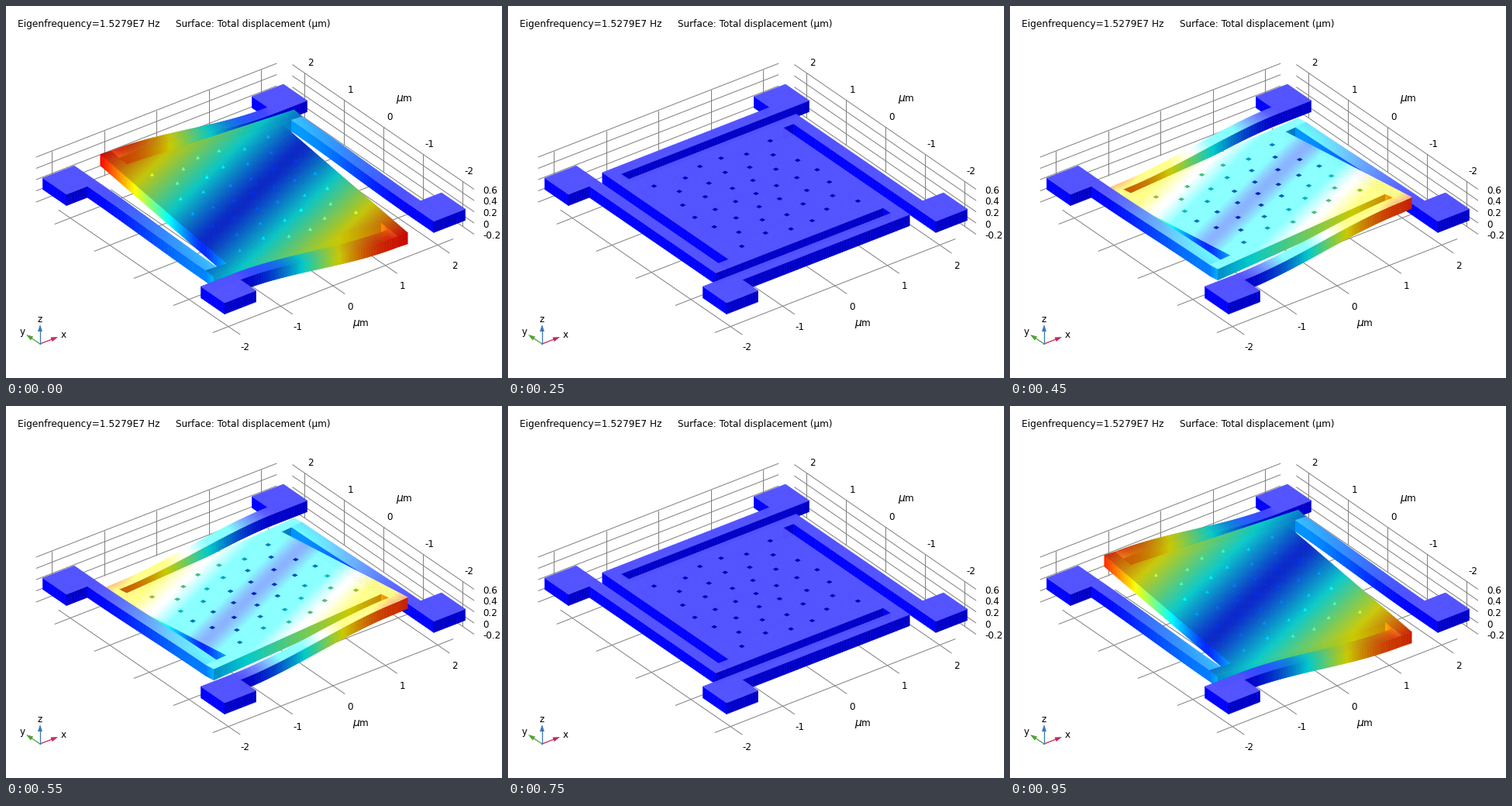
Animation of 640x480 px, one loop 1000 ms. Source, as a matplotlib script:

```python
import numpy as np
import matplotlib.pyplot as plt
from matplotlib.animation import FuncAnimation
from matplotlib.collections import LineCollection, PolyCollection

W, H, DPI = 640, 480, 100
FRAMES, INTERVAL = 20, 50
PX = 72 / DPI                      # one pixel in points
CELL, THICK = 0.05, 14.5           # mesh step in um, slab height in pixels
LIFT, SWAY = 23.5, 0.055           # corner travel in pixels, in-plane share
BOX, WALL, FLOOR = 2.3, 2.47, 49

plt.rcParams["font.family"] = "DejaVu Sans"


def project(x, y, drop=0.0):
    """Orthographic view; drop is pixels below the undeformed top face."""
    return np.stack([320 + 67.5 * x - 51 * y,
                     242 - 26.3 * x - 35 * y + drop], axis=-1)


# Tilting mode, scaled so that the outermost plate corner moves by 1
ANGLE = np.radians(25)
SLOPE = np.array([-np.sin(ANGLE), np.cos(ANGLE)])
SLOPE /= SLOPE @ [-1.5, 1.9]


def deflection(x, y):
    """Vertical motion and how far each point takes part in it (0 at pads)."""
    u, v = SLOPE
    w = u * x + v * y
    share = np.ones_like(w)
    p, q = x, y
    for _ in range(4):             # same clamped beam on each side
        t = np.clip((1.7 - q) / 3, 0, 1)
        ease = 3 * t**2 - 2 * t**3
        on_beam = (p < -1.6) & (q > -1.3)
        w = np.where(on_beam, (u * p - 1.3 * v) * ease, w)
        share = np.where(on_beam, ease, share)
        p, q, u, v = -q, p, -v, u
    return w, share


def is_solid(x, y):
    solid = (abs(x) < 1.5) & (abs(y) < 1.5)
    p, q = x, y
    for _ in range(4):
        pad = (p > -2.3) & (p < -1.7) & (q > 1.7) & (q < 2.3)
        beam = (p > -1.9) & (p < -1.7) & (q > -1.5) & (q < 1.75)
        arm = (p > -1.9) & (p < -1.4) & (q > -1.5) & (q < -1.3)
        solid = solid | pad | beam | arm
        p, q = -q, p
    return solid


def rainbow(f):
    third = [1 / 3, 2 / 3]
    return np.stack([np.interp(f, third, [0, 1]),
                     np.interp(f, [0, *third, 1], [0, 1, 1, 0]),
                     np.interp(f, third, [1, 0])], axis=-1)


# Mesh: visible top, left (-x) and front (-y) faces
n = round(2 * BOX / CELL)
centre = -BOX + CELL * (np.arange(n) + 0.5)
cx, cy = np.meshgrid(centre, centre, indexing="ij")
solid = is_solid(cx, cy)
padded = np.pad(solid, 1)
open_left = solid & ~padded[:-2, 1:-1]
open_front = solid & ~padded[1:-1, :-2]


def faces(mask, ox, oy, drops):
    x = cx[mask][:, None] + np.array(ox) * CELL / 2
    y = cy[mask][:, None] + np.array(oy) * CELL / 2
    return x, y, np.broadcast_to(np.array(drops) * THICK, x.shape)


parts = [faces(solid, [-1, 1, 1, -1], [-1, -1, 1, 1], [0, 0, 0, 0]),
         faces(open_left, [-1, -1, -1, -1], [-1, 1, 1, -1], [0, 0, 1, 1]),
         faces(open_front, [-1, 1, 1, -1], [-1, -1, -1, -1], [0, 0, 1, 1])]
kind = np.repeat([0, 1, 2], [len(p[0]) for p in parts])
fx, fy, fdrop = (np.concatenate(c) for c in zip(*parts))
fw, fshare = deflection(fx, fy)
mean_w = fw.mean(axis=1)
total = np.hypot(mean_w, SWAY * fshare.mean(axis=1))
flat = project(fx, fy, fdrop)
depth = (-0.517 * fx - 0.684 * fy - 0.518 * fdrop / 72.5).mean(axis=1)
slope_x = (fw[:, 1] - fw[:, 0]) / CELL
slope_y = (fw[:, 3] - fw[:, 0]) / CELL
facing = (slope_y - slope_x) / (SLOPE @ [-1, 1])

# Etch holes: centre, three rings and the corners
rings = [(0.39 * k * np.cos(a), 0.39 * k * np.sin(a))
         for k in (1, 2, 3) for a in np.arange(6 * k) * np.pi / (3 * k)]
corners = [(sx * 1.11, sy * 1.11) for sx in (-1, 1) for sy in (-1, 1)]
hx, hy = np.array([(0, 0)] + rings + corners).T
hw, _ = deflection(hx, hy)


def mesh_state(s):
    verts = flat.copy()
    verts[..., 1] -= LIFT * s * fw
    tilt = s * facing
    gain = np.interp(tilt, [-1, 0, 0.8, 1], [1, 1, 0.8, 0.74])
    glow = np.interp(tilt, [-1, -0.6, 0, 0.8, 1], [140, 126, 82, 14, 8]) / 255
    gain = np.choose(kind, [gain, 1.0, 0.79])
    glow = np.where(kind == 0, glow, 0)
    rgb = rainbow(abs(s) * total) * gain[:, None] + glow[:, None]
    order = np.argsort(depth + 0.518 * LIFT / 72.5 * s * mean_w)
    return verts[order], np.clip(rgb, 0, 1)[order]


def hole_state(s):
    up = max(s, 0)
    half = 4 - 1.5 * up
    shape = np.array([[-half, 1.5 * up], [0, -2.2 - 0.4 * up],
                      [half, 1.5 * up], [0, 2.2]])
    pos = project(hx, hy, -LIFT * s * hw)
    rgb = rainbow(abs(s) * np.hypot(hw, SWAY)) * (0.75 + 0.25 * up)
    return pos[:, None] + shape, rgb


fig = plt.figure(figsize=(W / DPI, H / DPI), dpi=DPI, facecolor="white")
ax = fig.add_axes([0, 0, 1, 1])
ax.set(xlim=(0, W), ylim=(H, 0))
ax.axis("off")


def label(x, y, text, size=12, ha="center", **style):
    ax.text(x, y, text, fontsize=size * PX, ha=ha, va="center_baseline",
            color="black", **style)


# Grid on the two back walls and the floor
grid = []


def grid_line(a, b):
    grid.append([project(*a), project(*b)])


Z_DROPS = [-21 + 14.5 * i for i in range(5)]
for d in Z_DROPS:
    grid_line((-BOX, WALL, d), (BOX, WALL, d))
    grid_line((WALL, BOX, d), (WALL, -BOX, d))
for t in range(-2, 3):
    grid_line((t, WALL, Z_DROPS[0]), (t, WALL, Z_DROPS[-1]))
    grid_line((WALL, t, Z_DROPS[0]), (WALL, t, Z_DROPS[-1]))
    grid_line((t, -BOX, FLOOR), (t, BOX, FLOOR))
    grid_line((-BOX, t, FLOOR), (BOX, t, FLOOR))
    x, y = project(t, -BOX, FLOOR)
    label(x + 6.5, y + 15, str(t))
    x, y = project(WALL, t, Z_DROPS[0])
    label(x + 8.5, y - 14, str(t))
for d, text in zip(Z_DROPS, ["0.6", "0.4", "0.2", "0", "-0.2"]):
    label(615.5, 258 + d, text, ha="left")
ax.add_collection(LineCollection(grid, colors="#808080", linewidths=PX,
                                 zorder=1))

for x, y in [(513, 118), (457, 408)]:
    label(x - 5, y, "μ", 14, style="italic")
    label(x + 5, y, "m")
label(15, 22, "Eigenfrequency=1.5279E7 Hz", 12.2, "left")
label(219, 22, "Surface: Total displacement (µm)", 12, "left")

# Orientation triad
origin = np.array([44, 436])
for name, tip, at, color in [("x", (67, 427), (74, 423), "#c8285a"),
                             ("y", (26, 424), (21, 419), "#55a03c"),
                             ("z", (44, 411), (44, 403), "#3c78b4")]:
    tip = np.array(tip)
    along = (tip - origin) / np.hypot(*(tip - origin))
    side = 3 * np.array([-along[1], along[0]])
    base = tip - 9 * along
    ax.plot(*zip(origin, base), color=color, lw=1.3 * PX)
    ax.fill(*zip(tip, base + side, base - side), color=color, lw=0)
    label(*at, name)

body = PolyCollection([], linewidths=0.6 * PX, zorder=3)
holes = PolyCollection([], linewidths=0, zorder=4)
ax.add_collection(body)
ax.add_collection(holes)


def update(frame):
    s = np.cos(2 * np.pi * frame / FRAMES)
    for artist, (verts, rgb) in ((body, mesh_state(s)), (holes, hole_state(s))):
        artist.set_verts(verts)
        artist.set_facecolor(rgb)
        artist.set_edgecolor(rgb)
    return body, holes


anim = FuncAnimation(fig, update, frames=FRAMES, interval=INTERVAL,
                     repeat=True, repeat_delay=0, blit=False)
plt.show()
```
